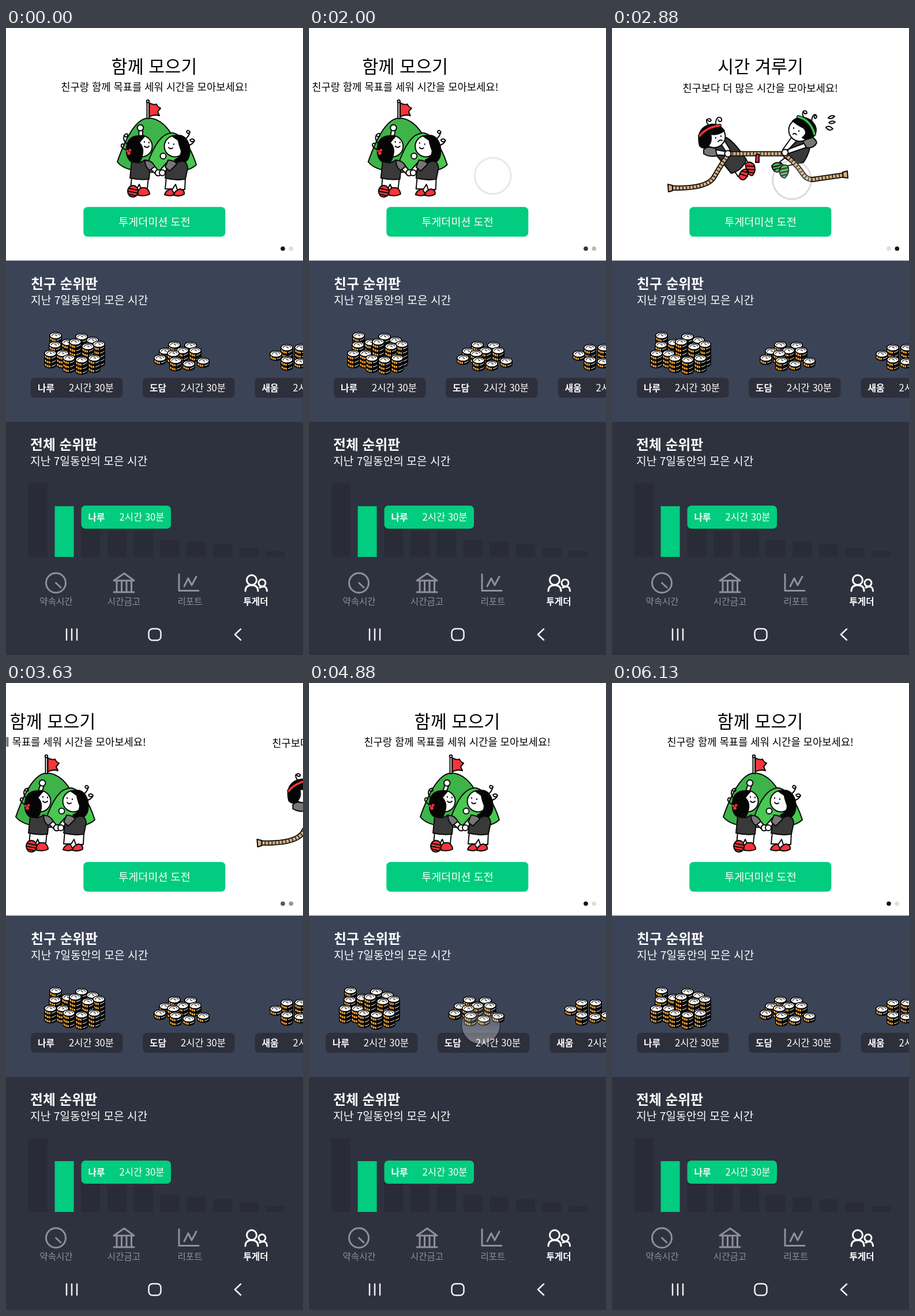
Write an HTML page that moves like this. It is 515 px wide and 1087 px high and loops after 6190 ms.

```html
<!DOCTYPE html>
<html lang="ko">
<head>
<meta charset="utf-8">
<style>
  html, body { margin: 0; width: 100%; height: 100%; overflow: hidden; background: #2e323e; }
  svg { display: block; width: 100%; height: 100%; }
  text { font-family: "Noto Sans CJK KR", "Noto Sans CJK", "Noto Sans KR", sans-serif; font-weight: 300; }
  .bold { font-weight: 700; }
  .mid { text-anchor: middle; }
  .title { font-size: 30.5px; font-weight: 400; }
  .lead { font-size: 17.7px; font-weight: 400; }
  .head { font-size: 23.8px; font-weight: 700; }
  .sub { font-size: 19.2px; font-weight: 400; }
  .name { font-size: 15.8px; font-weight: 700; }
  .time { font-size: 16.6px; }
  .tab { font-size: 15.6px; }
  .line { fill: none; stroke-width: 3; stroke-linecap: round; stroke-linejoin: round; }
  .art { stroke: #0a0a0a; stroke-width: 2; stroke-linejoin: round; stroke-linecap: round; fill: #fff; }
  .hair { fill: #050505; }
  .shirt { fill: #393939; }
  .sleeve { fill: #777; }
  .red { fill: #f9343a; }
  .green { fill: #3fb84a; }
  .open { fill: none; }
  .face { fill: none; stroke-width: 2; }
</style>
</head>
<body>
<svg viewBox="0 0 515 1087">
  <defs>
    <clipPath id="listClip"><path d="M27 490H515V660H27Z"/></clipPath>
    <linearGradient id="glass" x2="0" y2="1">
      <stop stop-color="#fff" stop-opacity=".1"/>
      <stop offset="1" stop-color="#fff" stop-opacity=".36"/>
    </linearGradient>
    <radialGradient id="halo">
      <stop offset=".88" stop-color="#000" stop-opacity="0"/>
      <stop offset=".9" stop-color="#000" stop-opacity=".2"/>
      <stop offset="1" stop-color="#000" stop-opacity="0"/>
    </radialGradient>
  </defs>

  <path fill="#fff" d="M0 0H515V403.5H0Z"/>
  <path fill="#3b4356" d="M0 403.5H515V683H0Z"/>
  <path fill="#2e323e" d="M0 683H515V1087H0Z"/>

  <g id="pages">
    <g>
      <text class="title mid" x="257" y="77.5">함께 모으기</text>
      <text class="lead mid" x="257" y="109">친구랑 함께 목표를 세워 시간을 모아보세요!</text>
      <g class="art">
        <path fill="#3eb349" d="M193 232Q219 157 247 156Q270 157 287 184L262 250Q207 251 193 232Z"/>
        <path fill="#48c850" d="M244 240Q263 180 290 182Q314 188 330 237Q318 249 286 250Q255 250 244 240Z"/>
        <path d="M244.5 128V157H248V128Z"/><circle cx="246" cy="127" r="2.2"/>
        <path class="red" d="M248.5 130Q256 134 261 132Q263 137 268 139L263 145L266 152Q257 149 248.5 154Z"/>

        <!-- left friend -->
        <g id="curls" class="open">
          <path d="M214 204Q201 196 205 186Q211 180 211 187Q209 191 205 187"/>
          <path d="M216 212Q208 214 200 206Q199 199 205 202"/>
        </g>
        <g id="wave">
          <path d="M230.5 177V195H237V177Z"/><circle cx="233" cy="173" r="5.3"/>
        </g>
        <circle cx="235" cy="205" r="18.5"/>
        <path class="hair" d="M231 187Q211 187 209 207Q207 226 219 233Q232 237 235 225Q241 208 231 199Q236 192 240 188Z"/>
        <path class="face" d="M240 197V198M248 198V199M240 205Q244 209 248 205"/>
        <g fill="#f9343a" stroke="#f9343a" stroke-width="1"><circle cx="213" cy="217" r="2.5"/><circle cx="215" cy="212" r="2"/><circle cx="210" cy="213" r="1.5"/></g>
        <path d="M246 240L259 253L264 247L253 234Z"/>
        <path d="M218 258L216 279H227L231 271L234 278H245L247 259Z"/>
        <path class="shirt" d="M218 231Q231 237 240 229Q250 229 250 241L248 262Q231 264 215 260Z"/>
        <path class="sleeve" d="M241 230Q252 228 258 240L249 247Q241 241 241 230Z"/>
        <path class="red" d="M229 290Q227 280 235 277H242Q249 281 249 288Q243 292 229 290Z"/>
        <ellipse class="red" cx="220" cy="283" rx="9" ry="10"/>
        <path class="open" d="M213 278L227 281M211 283L228 286M213 288L226 291"/>

        <!-- right friend -->
        <g class="open">
          <path d="M309 194Q317 189 319 180Q315 175 313 180Q315 185 319 181"/>
          <path d="M313 203Q323 204 327 195Q324 190 319 194Q321 199 326 196"/>
        </g>
        <circle cx="293" cy="205" r="18.5"/>
        <path class="hair" d="M289 188Q312 180 318 205Q321 225 311 232Q298 237 292 229Q304 224 304 213Q299 199 299 195Q295 192 289 188Z"/>
        <path class="face" d="M282 199V200M291 201V202M282 207Q285 211 289 208"/>
        <path d="M284 240L271 254L265 249L278 234Z"/>
        <path d="M278 258L276 279H289L294 271L297 280H310L311 259Z"/>
        <path class="shirt" d="M280 232Q292 237 303 231Q314 230 315 243L311 262Q294 265 276 260Z"/>
        <path class="sleeve" d="M281 229Q294 230 296 236L284 248L276 241Z"/>
        <path class="red" d="M275 289Q277 281 287 279L292 288Q287 293 275 289ZM291 290Q292 282 302 279Q310 281 309 288Q302 293 291 290Z"/>
        <circle cx="272.5" cy="222" r="5"/><circle cx="264" cy="251" r="5.3"/><circle cx="271" cy="251" r="5"/>
      </g>
    </g>

    <g transform="translate(515)">
      <text class="title mid" x="257.5" y="77.5">시간 겨루기</text>
      <text class="lead mid" x="257" y="110.5">친구보다 더 많은 시간을 모아보세요!</text>
      <g id="tug" class="art">
        <!-- left player -->
        <g class="open"><path d="M171 171Q163 166 164 159Q170 155 172 160Q170 164 166 160M180 168Q179 158 184 155Q191 154 190 161Q186 164 184 159"/></g>
        <path d="M209 243L219 258L243 242L229 224Z"/>
        <path class="shirt" d="M170 207L196 189Q209 193 233 228Q226 247 207 252Z"/>
        <path class="sleeve" d="M159 211Q166 203 180 209L183 221Q170 225 159 218Z"/>
        <path d="M180 211L202 215L201 221L182 220ZM190 187L205 211L199 216L184 194Z"/>
        <circle cx="177" cy="188" r="19.5"/>
        <path class="hair" d="M152 204Q146 181 161 171Q181 160 195 178Q183 187 171 184Q175 199 164 207Q157 210 152 204Z"/>
        <path class="open" stroke-width="6" d="M152 187Q164 172 187 169"/>
        <path class="open" style="stroke:#f9343a;stroke-width:3.5" d="M152 187Q164 172 187 169"/>
        <path class="face" d="M180 190V191M189 187V188M184 197Q187 193 191 195"/>
        <path class="red" d="M220 257Q225 241 236 246Q238 257 229 263Q222 264 220 257ZM231 235Q240 229 247 238Q250 250 243 256Q234 256 231 235Z"/>
        <path class="open" d="M222 253L235 257M225 248L237 251M234 239L246 240M235 245L248 246M237 250L246 251"/>

        <!-- right player -->
        <g class="open"><path d="M334 157Q328 149 332 144Q338 142 338 148Q334 150 332 146M346 162Q347 150 353 150Q357 154 353 157Q349 156 352 152"/></g>
        <path d="M291 232L300 240L321 235L312 216Z"/>
        <path class="shirt" d="M317 193L342 192Q347 211 332 233Q315 238 298 224Z"/>
        <path class="sleeve" d="M338 187Q352 188 355 199Q351 208 338 208L331 197Z"/>
        <path d="M333 200L301 212L302 219L337 207ZM311 190L296 211L302 215L320 196Z"/>
        <circle cx="326" cy="177" r="19.5"/>
        <path class="hair" d="M313 161Q327 149 345 160Q360 174 350 188Q338 196 330 190Q341 182 332 173Q324 170 313 161Z"/>
        <path class="open" stroke-width="6" d="M323 154Q345 160 351 184"/>
        <path class="open" style="stroke:#35c44a;stroke-width:3.5" d="M323 154Q345 160 351 184"/>
        <path class="face" d="M315 173V174M324 178V179M314 184Q317 181 320 185"/>
        <path class="green" d="M277 239Q284 230 293 235Q295 246 287 250Q279 249 277 239ZM290 245Q295 234 305 239Q309 251 300 260Q291 260 290 245Z"/>
        <path class="open" d="M278 241L292 238M280 246L293 242M292 245L306 242M291 251L306 248M294 256L303 254"/>

        <g class="open" id="ropes"></g>
        <path class="red" d="M250 219H255V233H249Z"/>
        <circle cx="201" cy="218" r="5.5"/><circle cx="300" cy="216" r="5.5"/>
        <path d="M375 156Q380 150 386 153Q381 159 375 156ZM376 164Q382 159 387 163Q381 168 376 164ZM371 172Q377 168 383 175Q376 180 371 172Z"/>
      </g>
    </g>
  </g>

  <rect x="134.3" y="310.3" width="246" height="51.4" rx="7" fill="#02cc7f"/>
  <text class="mid" x="257.5" y="342.5" font-size="18.5" fill="#fff">투게더미션 도전</text>
  <circle class="dot" cx="480" cy="382.5" r="3.8"/>
  <circle class="dot" cx="494.3" cy="382.5" r="3.8"/>

  <g fill="#fff">
    <text class="head" x="43" y="451.5">친구 순위판</text>
    <text class="sub" x="43" y="479">지난 7일동안의 모은 시간</text>
    <text class="head" x="42" y="730.5">전체 순위판</text>
    <text class="sub" x="42" y="758">지난 7일동안의 모은 시간</text>
  </g>
  <g clip-path="url(#listClip)"><g id="list"></g></g>
  <g id="chart"></g>

  <g class="line" stroke="#8e9099">
    <circle cx="86.5" cy="962" r="17"/><path d="M86.5 962L95 970"/>
    <path d="M187 958L205 945.5L222 958ZM192 959V976M200.5 959V976M209 959V976M217.5 959V976M187 978H222"/>
    <path d="M300 947V975.5H334M309 968L316 954L322 966L330 951"/>
  </g>
  <g class="line" stroke="#fff">
    <circle cx="426" cy="957" r="8.5"/><path d="M415 976Q415 966 426 966Q437 966 437 976"/>
    <circle cx="444" cy="962" r="6"/><path d="M440 970Q452 965 452.5 976"/>
  </g>
  <g fill="#8e9099">
    <text class="tab mid" x="87" y="1000">약속시간</text>
    <text class="tab mid" x="204.5" y="1000">시간금고</text>
    <text class="tab mid" x="319" y="1000">리포트</text>
    <text class="tab mid bold" x="433" y="1000" fill="#fff">투게더</text>
  </g>
  <g class="line" stroke="#f1f1f3" style="stroke-width:2.5">
    <path d="M105 1042V1061M114 1042V1061M123 1042V1061M407 1042L397 1051.5L407 1061"/>
    <rect x="247.5" y="1041.5" width="21" height="20" rx="6.5"/>
  </g>

  <g id="touch">
    <circle cy="1.5" r="36" fill="url(#halo)"/>
    <circle r="32" fill="url(#glass)" stroke="#fff" stroke-opacity=".2"/>
  </g>
</svg>
<script>
const LOOP = 6190, STEP = 62.5, PAGE = 515, SCROLL = 120;
const $ = id => document.getElementById(id);

// Each stack is [x, top y, number of coins], listed back to front.
const friends = [
  { x: 43, name: '나루', stacks: [[86,533,2],[131,535,2],[150,541,2],[107,545,2],[85,549,2],[120,544,4],
    [161,548,5],[142,552,3],[77,564,3],[98,564,3],[109,572,3],[131,575,3],[153,572,3]] },
  { x: 237, name: '도담', stacks: [[292,549,2],[320,550,2],[276,560,1],[306,559,2],[328,559,2],
    [290,564,2],[267,572,1],[294,576,2],[317,582,1],[342,577,1]] },
  { x: 431.5, name: '새움', stacks: [[487,554,3],[511,554,3],[468,565,1],[531,575,1],[487,575,2],[510,578,1]] }
];

const coin = (x, y) => `<g transform="translate(${x} ${y})" stroke="#050505" stroke-width="1.5">
  <path fill="#050505" d="M-10.2 0V6A10.2 5.6 0 0 0 10.2 6V0Z"/>
  <path fill="#f5a637" stroke="none" d="M-9.5 2.8Q-6.5 7 0 7.2V10.6Q-7 10.4 -9.5 6.8Z"/>
  <path stroke-width=".8" d="M-6.5 4V10M-3 5V11"/>
  <path fill="none" stroke="#fff" stroke-width="1" d="M2 8.6Q6.5 8 9.4 5"/>
  <ellipse fill="#fff" rx="10.2" ry="5.6"/>
  <path fill="none" stroke-width="1.1" d="M-7 1Q-5 -3.5 1 -3.5Q6 -3 7 0M-1 -1L3 1"/></g>`;

const stack = ([x, y, count]) =>
  Array.from({ length: count }, (_, i) => coin(x, y + 7 * (count - 1 - i))).join('');

const label = (x, y, name, width, height, fill) => `
  <rect x="${x}" y="${y}" width="${width}" height="${height}" rx="7" fill="${fill}"/>
  <g fill="#fff"><text class="name" x="${x + 12}" y="${y + height / 2 + 6}">${name}</text>
  <text class="time" x="${x + 66}" y="${y + height / 2 + 6}">2시간 30분</text></g>`;

$('list').innerHTML = friends.map(f =>
  f.stacks.map(stack).join('') + label(f.x, 606.5, f.name, 159.5, 34.5, '#2d303b')).join('');

$('chart').innerHTML = [128, 88, 60, 46, 46, 29, 26, 22, 16, 10].map((h, i) =>
  `<rect x="${38.8 + 45.75 * i}" y="${917 - h}" width="33" height="${h}" fill="${i === 1 ? '#02cc7f' : '#292c36'}"/>`
).join('') + label(130.5, 828, '나루', 155.5, 40, '#02cc7f');

const rope = 'M98 277Q162 280 176 260Q192 232 203 218H298Q319 234 331 253Q339 265 352 262L408 254';
$('ropes').innerHTML = [['#0a0a0a', 9], ['#d6b382', 5.5], ['#2f241a', 5.5, '1.8 4.2']].map(([color, width, dash]) =>
  `<path d="${rope}" style="stroke:${color};stroke-width:${width};stroke-linecap:butt;stroke-dasharray:${dash || 'none'}"/>`
).join('') + '<path fill="#d6b382" d="M97 271L105 273V282L98 284ZM400 250L408 248L409 260L401 259Z"/>';

// Touches: [start, end, x, y]; a finger follows whatever it drags.
const touches = [
  [1740, 2105, 409, 255], [2700, 3500, 312, 262],
  [4650, 5150, 312, 593], [5200, 5800, 192, 593]
];
const clamp = v => Math.max(0, Math.min(1, v));
const ease = (t, from, to) => { const u = clamp((t - from) / (to - from)); return u * u * (3 - 2 * u); };
const pageAt = t => ease(t, 1840, 2440) - ease(t, 3200, 3900);
const scrollAt = t => ease(t, 4800, 5150) - ease(t, 5500, 5850);
const dragAt = t => -PAGE * pageAt(t) - SCROLL * scrollAt(t);
const place = (id, transform) => $(id).setAttribute('transform', transform);
const gray = v => `rgb(${v},${v},${v})`;
const dots = document.querySelectorAll('.dot');

function draw(t) {
  const page = pageAt(t);
  place('pages', `translate(${-PAGE * page})`);
  place('list', `translate(${-SCROLL * scrollAt(t)})`);
  dots[0].setAttribute('fill', gray(17 + 204 * page));
  dots[1].setAttribute('fill', gray(221 - 204 * page));

  const swing = (1 - Math.cos(2 * Math.PI * t / 424)) / 2;
  place('wave', `rotate(${18 * swing} 235 193)`);
  place('curls', `rotate(${9 * swing} 216 210)`);
  place('tug', `translate(${1.5 * Math.sin(2 * Math.PI * (t - 2880) / 800)})`);

  const touch = touches.find(([start, end]) => t >= start && t < end);
  $('touch').style.display = touch ? '' : 'none';
  if (touch) {
    const [start, end, x, y] = touch;
    const shown = clamp(Math.min(t - start, end - t) / 150);
    place('touch', `translate(${x + dragAt(t) - dragAt(start)} ${y}) scale(${0.8 + 0.2 * shown})`);
    $('touch').style.opacity = shown;
  }
}

function tick() {
  const t = performance.now() % LOOP;
  draw(Math.floor((t + 5) / STEP) * STEP);
  requestAnimationFrame(tick);
}
tick();
</script>
</body>
</html>
```
